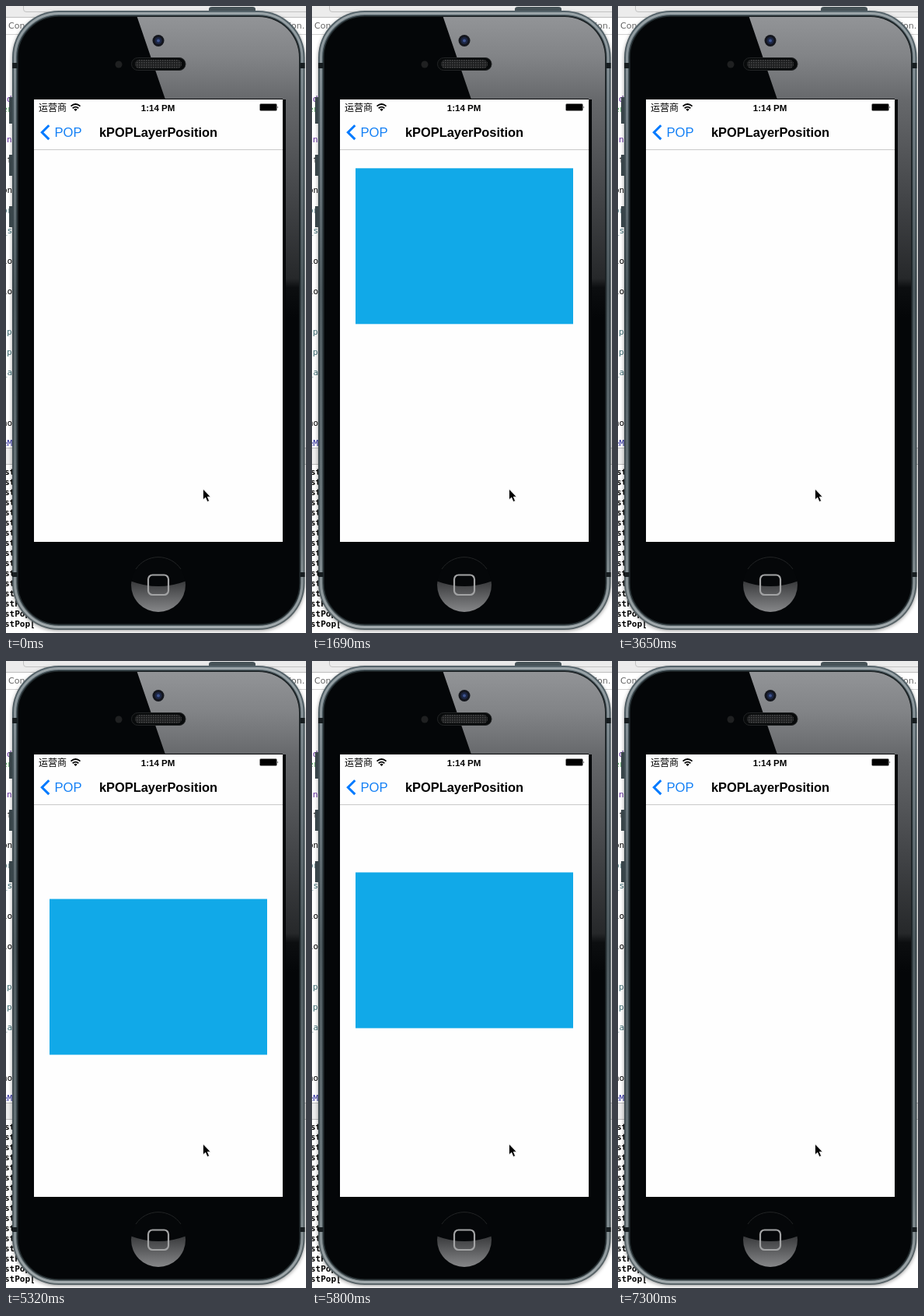
Write an HTML page that moves like this. It is 386x805 px and loops after 8 s.

```html
<!DOCTYPE html>
<html lang="en">
<head>
<meta charset="utf-8">
<title>kPOPLayerPosition</title>
<style>
  html, body { margin: 0; width: 100%; height: 100%; overflow: hidden; background: #fff; }
  svg { display: block; }
  text { white-space: pre; }
  .ui { font-family: "Liberation Sans", Arial, sans-serif; }
  .cjk { font: 12px "Noto Sans CJK SC", "Noto Sans CJK", sans-serif; }
  .code { font: 11px "DejaVu Sans Mono", monospace; }
  .log { font: bold 11px "DejaVu Sans Mono", monospace; }
  .tab { font: 11px "DejaVu Sans", sans-serif; fill: #666; }
</style>
</head>
<body>
<svg width="386" height="805" viewBox="0 0 386 805">
  <defs>
    <linearGradient id="gloss" gradientUnits="userSpaceOnUse" x1="0" y1="14" x2="0" y2="400">
      <stop offset="0" stop-color="#929497"/>
      <stop offset=".13" stop-color="#828487"/>
      <stop offset=".28" stop-color="#66686b"/>
      <stop offset=".6" stop-color="#434548"/>
      <stop offset=".87" stop-color="#26282a"/>
      <stop offset=".9" stop-color="#0c0e10"/>
      <stop offset="1" stop-color="#040608"/>
    </linearGradient>
    <linearGradient id="rim" x1="0" y1="0" x2="0" y2="1">
      <stop offset="0" stop-color="#55636a"/>
      <stop offset=".12" stop-color="#46545a"/>
      <stop offset=".45" stop-color="#333f44"/>
      <stop offset=".8" stop-color="#455156"/>
      <stop offset="1" stop-color="#5b666a"/>
    </linearGradient>
    <linearGradient id="edge" x1="0" y1="0" x2="0" y2="1">
      <stop offset="0" stop-color="#9aa4a8"/>
      <stop offset=".15" stop-color="#77838a"/>
      <stop offset=".45" stop-color="#4d595e"/>
      <stop offset=".85" stop-color="#6d797e"/>
      <stop offset="1" stop-color="#a3abae"/>
    </linearGradient>
    <linearGradient id="home" x1="0" y1="0" x2="0" y2="1">
      <stop offset="0" stop-color="#38393b"/>
      <stop offset="1" stop-color="#8a8b8d"/>
    </linearGradient>
    <pattern id="mesh" width="3" height="3" patternUnits="userSpaceOnUse">
      <rect width="3" height="3" fill="#1d1e1f"/>
      <rect width="1.5" height="1.5" fill="#48494a"/>
    </pattern>
    <filter id="soft" filterUnits="userSpaceOnUse" x="-10" y="-10" width="406" height="825"><feGaussianBlur stdDeviation=".7"/></filter>
    <filter id="haze" filterUnits="userSpaceOnUse" x="-10" y="-10" width="406" height="825"><feGaussianBlur stdDeviation="2.5"/></filter>
    <clipPath id="face"><rect x="16" y="14" width="361" height="779" rx="52"/></clipPath>
    <clipPath id="disc"><circle cx="196" cy="743" r="35"/></clipPath>
  </defs>

  <!-- desktop behind the phone -->
  <rect width="386" height="805" fill="#fff"/>
  <rect width="386" height="14" fill="#ececec"/>
  <path d="M22.500 0V4Q22.500 7.500 26 7.500H386" fill="none" stroke="#c2c2c2"/>
  <path d="M0 14.500H386" stroke="#bdbdbd"/>
  <path d="M0 36.500H386" stroke="#d0d0d0"/>
  <text class="tab" x="3" y="29">Con</text>
  <text class="tab" x="364" y="29">ion.</text>
  <g id="code"></g>
  <rect y="567" width="386" height="22" fill="#ececec"/>
  <path d="M0 567.500H386M0 588.500H386" stroke="#bbb"/>
  <g id="log"></g>

  <!-- phone body -->
  <rect x="8" y="8" width="376.500" height="794" rx="60" fill="#000" opacity=".4" filter="url(#haze)"/>
  <g filter="url(#soft)">
    <path d="M261 8V4Q261 1 265 1H317Q321 1 321 4V8Z" fill="#465257"/>
    <path d="M4 117H10V151H4ZM4 191H10V218H4ZM4 257H10V284H4Z" fill="#39454a"/>
    <rect x="8" y="6" width="376.500" height="795" rx="60" fill="url(#rim)"/>
    <rect x="11.500" y="9.500" width="369.500" height="788" rx="56.500" fill="none" stroke="url(#edge)" stroke-width="3"/>
    <path d="M8 73H15V80H8ZM377 73H384.500V80H377ZM8 727H15V733H8ZM377 727H384.500V733H377Z" fill="#171d20"/>
    <rect x="15" y="13" width="363" height="781" rx="53" fill="#040608" stroke="#20282b" stroke-width="1.500"/>
  </g>
  <path clip-path="url(#face)" d="M168 12L205 120H360V400H380V12Z" fill="url(#gloss)"/>

  <!-- camera, sensor, speaker -->
  <circle cx="196" cy="44.500" r="7.500" fill="#14161d"/>
  <circle cx="196" cy="44.500" r="4.500" fill="#1d2745"/>
  <circle cx="196" cy="44.500" r="2" fill="#3f5591"/>
  <circle cx="145" cy="75" r="4.500" fill="#1f2021"/>
  <rect x="161.500" y="66.500" width="69.500" height="16" rx="8" fill="#080a0b" stroke="#222425"/>
  <rect x="166" y="69" width="60" height="11" rx="5.500" fill="url(#mesh)"/>

  <!-- home button -->
  <circle cx="196" cy="743" r="35" fill="#050709"/>
  <path d="M167 723A35 35 0 0 1 225 723" fill="none" stroke="#222425"/>
  <path clip-path="url(#disc)" d="M160 738Q196 752 232 738V780H160Z" fill="url(#home)"/>
  <rect x="183" y="730.500" width="26" height="25.500" rx="5.500" fill="none" stroke="#a2a3a4" stroke-width="2.200"/>

  <!-- screen -->
  <rect x="36" y="119" width="320" height="569" fill="#040608"/>
  <rect x="36" y="120" width="320" height="568" fill="#fefefe"/>
  <path d="M36 184.500H356" stroke="#cacaca"/>
  <rect id="card" x="56" y="0" width="280" height="200" fill="#11a9e8"/>
  <text class="cjk" x="42" y="134.500">运营商</text>
  <g fill="none" stroke="#000" stroke-width="1.800">
    <path d="M83.500 128.600Q89.500 123.400 95.500 128.600"/>
    <path d="M85.700 131.200Q89.500 128 93.300 131.200"/>
  </g>
  <path d="M87.300 132.700Q89.500 131 91.700 132.700L89.500 135Z"/>
  <text class="ui" x="195.500" y="134.500" font-size="11.500" font-weight="bold" text-anchor="middle">1:14 PM</text>
  <rect x="326.500" y="125.500" width="22" height="9" rx="1.500" fill="none" stroke="#8c8c8c"/>
  <rect x="327" y="126" width="21" height="8" rx=".5"/>
  <path d="M349.500 128.500Q351 130 349.500 131.500Z"/>
  <path d="M55.300 153.300L46.300 162.200L55.300 171.100" fill="none" stroke="#007aff" stroke-width="3"/>
  <text class="ui" x="62.500" y="168" font-size="16.600" fill="#1480f5">POP</text>
  <text class="ui" x="196" y="168" font-size="16.400" font-weight="bold" text-anchor="middle">kPOPLayerPosition</text>

  <!-- pointer -->
  <path d="M253.500 620V634L256.700 631.100L259 636.500L261.600 635.400L259.300 630.200H263.300Z" fill="#000" stroke="#fff" stroke-width=".8"/>
</svg>
<script>
  const LOOP = 8000, REST = 260;
  const card = document.getElementById('card');

  function addText(id, cls, x, y, str, fill = '#000') {
    const el = document.createElementNS('http://www.w3.org/2000/svg', 'text');
    Object.entries({ class: cls, x, y, fill }).forEach(([k, v]) => el.setAttribute(k, v));
    el.textContent = str;
    document.getElementById(id).append(el);
  }

  const purple = '#5c2699', green = '#1f8a2e', teal = '#3f6e74';
  [
    ['d', 123, purple], ['er', 136, green], ['n', 175, purple], ['f', 201], ['on', 240],
    ['or', 266, teal], ['_s', 292, teal], ['lo', 331], ['lo', 370], ['p', 422, teal],
    ['p', 448, teal], ['_a', 474, teal], ['no', 539], ['eM', 565, '#2a2a9c']
  ].forEach(([str, y, fill]) => addText('code', 'code', str.length > 1 ? -5 : 1, y, str, fill));

  for (let i = 0; i < 16; i++) addText('log', 'log', -2, 602 + 13 * i, 'stPop[');

  // Underdamped spring dropping in from above the screen
  function spring(ms) {
    const t = ms / 1000, k = 5.6, w = 17.6;
    return -438 * Math.exp(-k * t) * (Math.cos(w * t) + k / w * Math.sin(w * t));
  }

  const range = (n, f) => Array.from({ length: n }, (_, i) => f(i));
  const drops = [
    { start: 1319.4, hide: 3590, times: [1440, ...range(12, i => 1520 + 10 * Math.round(i * 69 / 11)), 2270, 2360, 2450] },
    { start: 5202.3, hide: 7240, times: [...range(14, i => 5320 + 60 * i), ...range(4, i => 6160 + 80 * i)] }
  ];

  const key = (ms, y, opacity) => ({
    offset: ms / LOOP, transform: `translateY(${y.toFixed(2)}px)`, opacity, easing: 'steps(1, end)'
  });
  const frames = [key(0, REST, 0)];
  for (const { start, hide, times } of drops) {
    const last = times.length - 1;
    times.forEach((ms, i) => frames.push(key(ms, i < last ? REST + spring(ms - start) : REST, 1)));
    frames.push(key(hide, REST, 0));
  }
  frames.push(key(LOOP, REST, 0));
  card.animate(frames, { duration: LOOP, iterations: Infinity });
</script>
</body>
</html>
```
